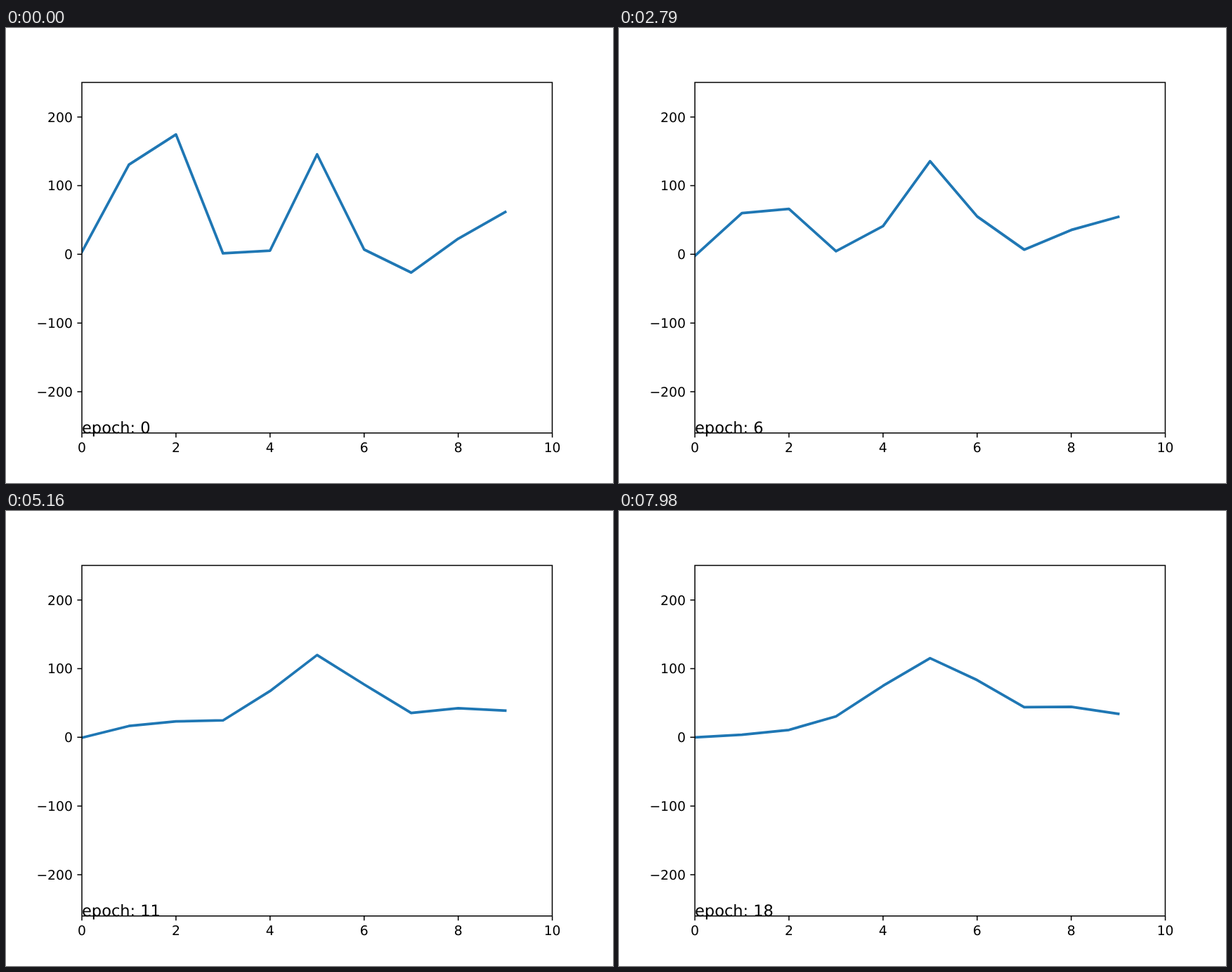
These frames come from a looping animation (864x648 px, 8000 ms). An HTML page:

```html
<!DOCTYPE html>
<html lang="en">
<head>
<meta charset="utf-8">
<title>Weights per epoch</title>
<style>
  html, body { margin: 0; width: 100%; height: 100%; overflow: hidden; background: #fff; }
  svg { display: block; width: 864px; height: 648px; }
  text { font-family: "DejaVu Sans", sans-serif; font-size: 18.75px; text-rendering: geometricPrecision; }
  #epoch { font-size: 22.5px; }
  #curve { fill: none; stroke: #1f77b4; stroke-width: 3.75; stroke-linejoin: round; stroke-linecap: square; }
  #axes { fill: none; stroke: #000; stroke-width: 1.5; }
</style>
</head>
<body>
<svg viewBox="0 0 864 648">
  <clipPath id="plot"><rect x="108" y="77.5" width="669.5" height="499.3"/></clipPath>
  <g clip-path="url(#plot)"><polyline id="curve"/></g>
  <path id="axes"/>
  <g id="labels"></g>
  <text id="epoch" x="108" y="577"></text>
</svg>
<script>
const LOOP = 8000, STEP = 30, STEPS_PER_EPOCH = 14.7;
const DRIFT = 1980;   // ms of steady drift before the weights settle
const RATE = 0.555;   // settling rate per second
const LEFT = 108, RIGHT = 777.5, TOP = 77.5, BOTTOM = 576.8, TICK = 6.56;

const el = id => document.getElementById(id);
const px = x => LEFT + x * 66.96;
const py = y => 322.33 - y * 0.9784;

const weights = [
  { from: 3.5, via: -3.5, to: 0 },
  { from: 130.5, via: 93.8, to: 0.5 },
  { from: 174.5, via: 99.5, to: 7.5 },
  { from: 1.4, via: -11, to: 32 },
  { from: 5.4, via: 20.8, to: 77 },
  { from: 145.5, via: 147.8, to: 114 },
  { from: 7, via: 38.2, to: 85 },
  { from: -26.5, via: -15.4, to: 46 },
  { from: 22.8, via: 30, to: 45 },
  { from: 61.7, via: 66.8, to: 33 }
];

// Linear drift first, then exponential convergence.
function weightAt({ from, via, to }, t) {
  if (t < DRIFT) return from + (via - from) * t / DRIFT;
  return to + (via - to) * Math.exp(-RATE * (t - DRIFT) / 1000);
}

function addLabel(text, x, y, anchor) {
  const label = document.createElementNS("http://www.w3.org/2000/svg", "text");
  label.setAttribute("x", x);
  label.setAttribute("y", y);
  label.setAttribute("text-anchor", anchor);
  label.textContent = text;
  el("labels").append(label);
}

function drawAxes() {
  let path = `M${LEFT} ${TOP}H${RIGHT}V${BOTTOM}H${LEFT}Z`;
  for (let x = 0; x <= 10; x += 2) {
    path += `M${px(x)} ${BOTTOM}v${TICK}`;
    addLabel(x, px(x), 604, "middle");
  }
  for (let y = -200; y <= 200; y += 100) {
    path += `M${LEFT} ${py(y)}h${-TICK}`;
    addLabel(String(y).replace("-", "\u2212"), 94.9, py(y) + 6.9, "end");
  }
  el("axes").setAttribute("d", path);
}

function render(now) {
  const step = Math.floor((now % LOOP) / STEP);
  const points = weights.map((w, i) => `${px(i)},${py(weightAt(w, step * STEP)).toFixed(2)}`);
  el("curve").setAttribute("points", points.join(" "));
  el("epoch").textContent = `epoch: ${Math.floor(step / STEPS_PER_EPOCH)}`;
}

drawAxes();
const start = performance.now();
function tick() {
  render(performance.now() - start);
  requestAnimationFrame(tick);
}
tick();
</script>
</body>
</html>
```
